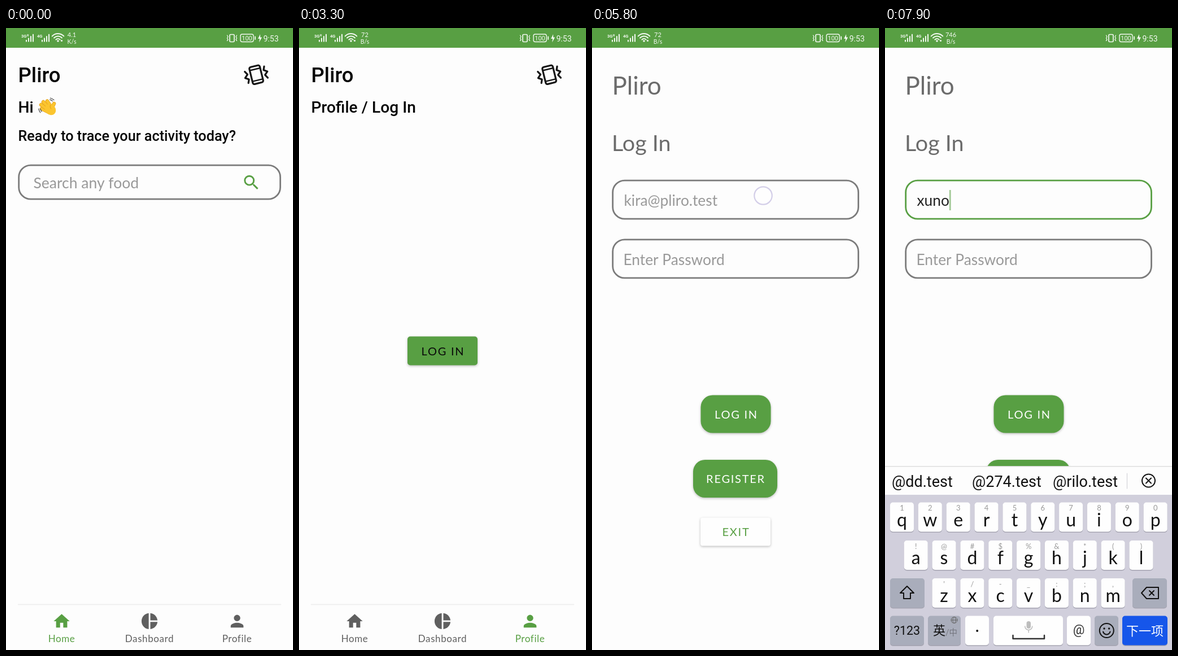
Animation of 508x1102 px, one loop 8000 ms. Source, as an HTML page with a canvas:

```html
<!DOCTYPE html>
<html lang="en">
<head>
<meta charset="utf-8">
<title>Food tracker demo</title>
<style>
html, body { margin: 0; width: 100%; height: 100%; overflow: hidden; background: #fdfdfd; }
canvas { display: block; width: 508px; height: 1102px; }
</style>
</head>
<body>
<canvas id="stage"></canvas>
<script>
const W = 508, H = 1102, LOOP = 8000, BAR = 35;
const GREEN = '#589f43', PAGE = '#fdfdfd', GREY = '#5f5f5f', HINT = '#999', EDGE = '#7b7b7b';
const UI = 'Lato, "Noto Sans CJK SC", "Noto Sans CJK JP", "Noto Sans CJK", sans-serif';
const HEAD = 'Roboto, sans-serif';
const APP = 'Pliro', MAIL = 'kira@pliro.test', TYPED = 'xuno';

const canvas = document.getElementById('stage');
const ctx = canvas.getContext('2d');
const dpr = window.devicePixelRatio || 1;
canvas.width = W * dpr;
canvas.height = H * dpr;

const ICONS = {
  home: new Path2D('M10 20v-6h4v6h5v-8h3L12 3 2 12h3v8z'),
  pie: new Path2D('M11 2v20c-5.07-.5-9-4.79-9-10s3.93-9.5 9-10zm2.03 0v8.99H22c-.47-4.74-4.24-8.52-8.97-8.99zm0 11.01V22c4.74-.47 8.5-4.25 8.97-8.99z'),
  person: new Path2D('M12 12c2.21 0 4-1.79 4-4s-1.79-4-4-4-4 1.79-4 4 1.79 4 4 4zm0 2c-2.67 0-8 1.34-8 4v2h16v-2c0-2.66-5.33-4-8-4z'),
  search: new Path2D('M15.5 14h-.79l-.28-.27A6.47 6.47 0 0 0 16 9.5 6.5 6.5 0 1 0 9.5 16c1.61 0 3.09-.59 4.23-1.57l.27.28v.79l5 4.99L20.49 19zm-6 0a4.5 4.5 0 1 1 0-9 4.5 4.5 0 0 1 0 9z')
};
const NAV = [['home', 'Home', 98.5], ['pie', 'Dashboard', 254], ['person', 'Profile', 409]];
const PAGES = [drawHome, drawDashboard, drawProfile];

const SWITCH = [1000, 2050];          // page changes in the bottom bar
const SLIDE = 4250, SLIDE_MS = 450;   // log-in screen reveal
const FOCUS = 5870, KEYS_UP = 6020, KEYS_MS = 320;
const TYPE_AT = 7200, TYPE_STEP = 150;
const SPEED = [[0, '4.1', 'K/s'], [300, '228', 'B/s'], [3100, '72', 'B/s'], [6300, '746', 'B/s']];

const KEY_ROWS = [
  ['qwertyuiop', '1234567890', 9, 840.5],
  ['asdfghjkl', '!@#$%&*()', 33.7, 908],
  ['zxcvbnm', "'/-_:;,", 83.5, 975]
];
const KEY_STEP = 49.85, KEY_W = 42, KEY_H = 52;

// x, y, press time, release time
const TAPS = [
  [254, 1064, 880, 1260],
  [409, 1064, 1950, 2250],
  [265, 570, 4150, 4290],
  [303, 297, 5650, 5870],
  ...[...TYPED].map((c, i) => {
    const t = TYPE_AT + i * TYPE_STEP;
    return [...keyCentre(c), t - 40, t + 20];
  })
];

const clamp = v => Math.max(0, Math.min(1, v));
const ramp = (t, from, ms) => clamp((t - from) / ms);
const easeOut = (p, n) => 1 - Math.pow(1 - p, n);

function keyCentre(c) {
  const [letters, , x, y] = KEY_ROWS.find(r => r[0].includes(c));
  return [x + letters.indexOf(c) * KEY_STEP + KEY_W / 2, y + KEY_H / 2];
}

function text(s, x, y, size, color, { font = UI, weight = 400, align = 'left', spacing = 0 } = {}) {
  ctx.font = `${weight} ${size}px ${font}`;
  ctx.textAlign = align;
  ctx.letterSpacing = spacing + 'px';
  ctx.fillStyle = color;
  ctx.fillText(s, x, y);
}

function heading(s, y, size, x = 21.5, align = 'left') {
  text(s, x, y, size, '#050505', { font: HEAD, weight: 500, align });
}

function box(x, y, w, h, r) {
  ctx.beginPath();
  ctx.roundRect(x, y, w, h, r);
}

function line(points, color, width, close) {
  ctx.beginPath();
  points.forEach(([x, y]) => ctx.lineTo(x, y));
  if (close) ctx.closePath();
  ctx.strokeStyle = color;
  ctx.lineWidth = width;
  ctx.lineCap = ctx.lineJoin = 'round';
  ctx.stroke();
}

function disc(x, y, r, color) {
  ctx.beginPath();
  ctx.arc(x, y, r, 0, Math.PI * 2);
  ctx.fillStyle = color;
  ctx.fill();
}

function ring(x, y, r, color, width, from = 0, to = Math.PI * 2) {
  ctx.beginPath();
  ctx.arc(x, y, r, from, to);
  ctx.strokeStyle = color;
  ctx.lineWidth = width;
  ctx.stroke();
}

function layer(draw, { x = 0, y = 0, alpha = 1, scale = 1, turn = 0 } = {}) {
  ctx.save();
  ctx.translate(x, y);
  ctx.scale(scale, scale);
  ctx.rotate(turn);
  ctx.globalAlpha *= alpha;
  draw();
  ctx.restore();
}

function icon(name, x, y, color, scale = 1.411) {
  layer(() => {
    ctx.fillStyle = color;
    ctx.fill(ICONS[name], 'evenodd');
  }, { x, y, scale });
}

function button(label, x, y, w, h, r, fill, color) {
  ctx.save();
  ctx.shadowColor = 'rgba(0,0,0,.26)';
  ctx.shadowBlur = 4 * dpr;
  ctx.shadowOffsetY = 1.5 * dpr;
  box(x, y, w, h, r);
  ctx.fillStyle = fill;
  ctx.fill();
  ctx.restore();
  text(label, x + w / 2 + 1, y + h / 2 + 7.8, 20, color, { align: 'center', spacing: 1.76 });
}

function field(x, y, w, h, color) {
  box(x, y, w, h, 21);
  ctx.strokeStyle = color;
  ctx.lineWidth = 2.8;
  ctx.stroke();
}

function drawStatus(t) {
  ctx.fillStyle = GREEN;
  ctx.fillRect(0, 0, W, BAR);
  const ink = 'rgba(255,255,255,.92)';
  [[27, '3G', 35], [55, '4G', 63]].forEach(([x, label, bars]) => {
    text(label, x, 17, 7.5, ink, { font: HEAD, weight: 700 });
    ctx.fillStyle = ink;
    for (let i = 0; i < 4; i++) ctx.fillRect(bars + i * 4, 21 - i * 3.4, 2, 3.5 + i * 3.4);
  });
  text('R', 37, 15, 5.5, ink, { font: HEAD, weight: 700 });
  [5, 9.5, 14].forEach(r => ring(92, 24, r, ink, 2, -Math.PI * .76, -Math.PI * .24));
  disc(92, 23, 1.8, ink);
  disc(98.5, 22.5, 1.6, ink);

  const [, value, unit] = SPEED.filter(s => s[0] <= t).pop();
  text(value, 116.5, 16, 11, ink, { align: 'center' });
  text(unit, 116.5, 28, 10.5, ink, { align: 'center' });

  box(396, 11.5, 8, 13, 1.5);
  ctx.strokeStyle = ink;
  ctx.lineWidth = 1.7;
  ctx.stroke();
  line([[391.5, 13], [393, 15.5], [391.5, 18], [393, 20.5], [391.5, 22.5]], ink, 1.3);
  line([[408.5, 13], [407, 15.5], [408.5, 18], [407, 20.5], [408.5, 22.5]], ink, 1.3);
  box(415, 11, 23, 13.5, 3);
  ctx.lineWidth = 1.4;
  ctx.stroke();
  text('100', 426.5, 22, 11, ink, { font: HEAD, align: 'center' });
  line([[441, 15.5], [441, 20]], ink, 1.8);
  ctx.beginPath();
  [[450, 11], [446, 19], [449, 19], [448, 25.5], [453, 16.5], [450, 16.5]].forEach(p => ctx.lineTo(...p));
  ctx.fillStyle = ink;
  ctx.fill();
  text('9:53', 455.5, 23.5, 14, ink, { font: HEAD });
}

function drawPhone() {
  const ink = '#151515';
  layer(() => {
    box(-9.5, -15.5, 19, 31, 3);
    ctx.strokeStyle = ink;
    ctx.lineWidth = 3.2;
    ctx.stroke();
    line([[-9, -10], [9, -10]], ink, 2.5);
    line([[-9, 10], [9, 10]], ink, 2.5);
    for (const s of [-1, 1]) {
      line([[17, -11], [14.5, -5], [20.5, -1], [15, 4], [18.5, 10]].map(([x, y]) => [s * x, s * y]), ink, 3.2);
    }
  }, { x: 443, y: 82.8, turn: -.24 });
}

function drawWave() {
  const gold = '#fbc52f', shade = '#e39c1c';
  layer(() => {
    line([[6, 5], [11, -6]], shade, 6.5);
    line([[6, 5], [11, -6]], gold, 5.2);
    [[-11, 3], [-12, -4], [-8, -9], [-1, -10.5]].forEach(([x, y], i) => {
      const root = [1 + i * 2, 9 - i * 2.6];
      line([[x, y], root], shade, 6.4);
      line([[x, y], root], gold, 5);
    });
    ctx.beginPath();
    ctx.ellipse(4.5, 4.5, 10.5, 9, .8, 0, Math.PI * 2);
    ctx.fillStyle = gold;
    ctx.fill();
    ring(10, -1, 6, shade, 1, 2.4, 3.6);
    [2.5, -1.3].forEach(a => {
      ring(0, 0, 13.5, '#555', 1.3, a, a + .4);
      ring(0, 0, 16.5, '#555', 1.3, a, a + .45);
    });
  }, { x: 74, y: 140 });
}

function drawHome() {
  heading('Hi', 150, 28.2);
  drawWave();
  heading('Ready to trace your activity today?', 200, 25.2);
  field(22.7, 243.2, 462.8, 60, EDGE);
  text('Search any food', 48.5, 284, 26.5, HINT);
  icon('search', 417, 256.5, GREEN, 1.44);
}

function drawDashboard() {
  heading('Dashboard', 150, 28.2);
  const mid = { align: 'center' };
  const col = i => 78.7 + i * 58.3;
  line([[82, 203.5], [75, 210.5], [82, 217.5]], '#151515', 2.8);
  line([[426.5, 203.5], [433.5, 210.5], [426.5, 217.5]], '#151515', 2.8);
  text('2021年12月', 254, 217.5, 19.5, '#1a1a1a', { align: 'center', weight: 500 });
  [...'日一二三四五六'].forEach((d, i) => text(d, col(i), 281.5, 16.5, '#777', mid));
  disc(428.5, 385.8, 28.4, '#9fc693');
  for (let d = 1; d <= 31; d++) {
    const cell = d + 2;
    const y = 335.3 + Math.floor(cell / 7) * 56.55;
    text(d, col(cell % 7), y, 17, d === 11 ? '#fff' : '#1c1c1c', { align: 'center', spacing: .4 });
  }
  heading('~ User Intakes ~', 642, 25.2, 254, 'center');
}

function drawProfile(t) {
  heading('Profile / Log In', 150, 28.2);
  const pressed = t > 4160 && t < 5000;
  button('LOG IN', 192, 546.5, 124, 51, 5, pressed ? '#427a33' : GREEN, '#0a0a0a');
}

function drawNav(t, active) {
  ctx.fillStyle = '#eeeeee';
  ctx.fillRect(21, 1020.5, 466, 1.8);
  ctx.save();
  ctx.beginPath();
  ctx.rect(0, 1022.5, W, H);
  ctx.clip();
  SWITCH.forEach((at, i) => {
    const grow = ramp(t, at - 60, 220), fade = ramp(t, at + 280, 280);
    if (grow > 0 && fade < 1) {
      disc(NAV[i + 1][2], 1062, 22 + 31.5 * easeOut(grow, 2), `rgba(0,0,0,${.1 * (1 - fade)})`);
    }
  });
  ctx.restore();
  NAV.forEach(([name, label, x], i) => {
    const color = i === active ? GREEN : GREY;
    icon(name, x - 16.9, 1034, color);
    text(label, x, 1088, 17, color, { align: 'center', spacing: .6 });
  });
}

function drawTabs(t) {
  ctx.fillStyle = PAGE;
  ctx.fillRect(0, BAR, W, H - BAR);
  heading(APP, 96, 36.5);
  drawPhone();
  const active = SWITCH.filter(s => t >= s).length;
  const shown = active ? ramp(t, SWITCH[active - 1] - 50, 150) : 1;
  if (shown < 1) layer(() => PAGES[active - 1](t), { alpha: 1 - shown });
  layer(() => PAGES[active](t), { alpha: shown });
  drawNav(t, active);
}

function drawLogin(t) {
  ctx.fillStyle = PAGE;
  ctx.fillRect(-W, BAR, W * 3, H);
  text(APP, 35.5, 118, 44, '#6b6b6b');
  text('Log In', 35, 218, 39.5, '#6b6b6b');
  const focused = t >= FOCUS;
  field(36.7, 270.2, 434.8, 68, focused ? GREEN : EDGE);
  field(36.7, 374.9, 434.8, 68, EDGE);

  const count = t < TYPE_AT ? 0 : Math.min(TYPED.length, 1 + Math.floor((t - TYPE_AT) / TYPE_STEP));
  const typed = TYPED.slice(0, count);
  text(typed || MAIL, 56.5, 315, 26.3, count ? '#222' : HINT);
  const caretX = 56.5 + (count ? ctx.measureText(typed).width : 0);
  text('Enter Password', 55.5, 419.5, 26.3, HINT);
  if (focused && (count || (t - FOCUS) % 1000 < 500)) {
    ctx.fillStyle = 'rgba(88,159,67,.55)';
    ctx.fillRect(caretX, 287, 2.8, 36);
  }
  button('LOG IN', 192.5, 650.5, 124, 67, 21, GREEN, '#fff');
  button('REGISTER', 179, 765, 149, 67, 21, GREEN, '#fff');
  button('EXIT', 192, 867.5, 124, 50, 4, '#fefefe', GREEN);
}

function key(x, y, w, fill = '#fefefe') {
  box(x, y + 1.5, w, KEY_H, 5);
  ctx.fillStyle = '#a5a4b1';
  ctx.fill();
  box(x, y, w, KEY_H, 5);
  ctx.fillStyle = fill;
  ctx.fill();
}

function drawKeyboard() {
  const dark = '#a9adbb', ink = '#111', mid = { align: 'center' };
  ctx.fillStyle = PAGE;
  ctx.fillRect(0, 777, W, 50);
  ctx.fillStyle = '#dedede';
  ctx.fillRect(0, 776, W, 1.5);
  ctx.fillStyle = '#d1cfdc';
  ctx.fillRect(0, 827, W, H - 827);
  [['@dd.test', 12], ['@274.test', 154], ['@rilo.test', 297]]
    .forEach(([s, x]) => text(s, x, 813, 27, ink, { font: HEAD }));
  line([[428.5, 789], [428.5, 816]], '#d3d3d8', 1.2);
  ring(466.5, 802, 11.5, ink, 2);
  line([[462, 797.5], [471, 806.5]], ink, 2);
  line([[471, 797.5], [462, 806.5]], ink, 2);

  KEY_ROWS.forEach(([letters, hints, x0, y]) => {
    [...letters].forEach((c, i) => {
      const x = x0 + i * KEY_STEP;
      key(x, y, KEY_W);
      text(hints[i], x + KEY_W / 2, y + 14.5, 13, HINT, mid);
      text(c, x + KEY_W / 2, y + 42, 32, ink, mid);
    });
  });

  key(9, 975, 61, dark);
  line([[39, 989], [51, 1001], [45, 1001], [45, 1011], [33, 1011], [33, 1001], [27, 1001]], ink, 2, true);
  key(438, 975, 61, dark);
  line([[454, 1001], [463, 991], [484, 991], [484, 1011], [463, 1011]], ink, 2, true);
  line([[468, 997], [476, 1005]], ink, 2);
  line([[476, 997], [468, 1005]], ink, 2);

  const y = 1041.5;
  key(9, y, 60, dark);
  text('?123', 39, 1075, 21.5, ink, { align: 'center', font: HEAD });
  key(76, y, 58, dark);
  text('英', 85, 1075, 22, ink);
  text('/中', 107, 1076, 14.5, '#74767f');
  ring(122.5, 1049, 5.5, '#666', 1);
  line([[117, 1049], [128, 1049]], '#666', 1);
  ctx.beginPath();
  ctx.ellipse(122.5, 1049, 2.5, 5.5, 0, 0, Math.PI * 2);
  ctx.stroke();
  key(142, y, KEY_W);
  disc(163.2, 1068, 2, ink);
  key(192, y, 123);
  box(250.5, 1051, 7.5, 13, 4);
  ctx.fillStyle = '#bdbdbd';
  ctx.fill();
  ring(254.2, 1060, 6.5, '#bdbdbd', 1.5, 0, Math.PI);
  line([[254.2, 1067], [254.2, 1071]], '#bdbdbd', 1.5);
  line([[226.5, 1076], [226.5, 1082], [282, 1082], [282, 1076]], '#333', 2.5);
  key(322, y, KEY_W);
  text('@', 343.2, 1073.5, 23, '#333', { align: 'center', font: HEAD });
  key(371, y, KEY_W, dark);
  ring(392.3, 1067.5, 12.5, ink, 2);
  disc(388, 1064, 1.7, ink);
  disc(396.6, 1064, 1.7, ink);
  ring(392.3, 1068, 6.5, ink, 2, .25, Math.PI - .25);
  key(420, y, 80, '#1656ea');
  text('下一项', 460, 1075.5, 22, '#fff', mid);
}

function drawTaps(t) {
  TAPS.forEach(([x, y, down, up]) => {
    const alpha = ramp(t, down, 60) * (1 - ramp(t, up, 170));
    if (alpha <= 0) return;
    layer(() => {
      disc(x, y, 16, 'rgba(255,255,255,.6)');
      ring(x, y, 15.7, '#d3cee8', 2.2);
    }, { alpha });
  });
}

function render(t) {
  ctx.setTransform(dpr, 0, 0, dpr, 0, 0);
  const shift = easeOut(ramp(t, SLIDE, SLIDE_MS), 2.4);
  const edge = W * (1 - shift);
  if (shift < 1) layer(() => drawTabs(t), { x: -.2 * (W - edge) });
  drawStatus(t);
  if (shift > 0) {
    ctx.fillStyle = `rgba(0,0,0,${.1 * shift})`;
    ctx.fillRect(0, 0, edge, H);
    ctx.save();
    ctx.beginPath();
    ctx.rect(edge, BAR, W, H);
    ctx.clip();
    layer(() => drawLogin(t), { x: edge / 2 });
    ctx.restore();
  }
  const rise = easeOut(ramp(t, KEYS_UP, KEYS_MS), 2.4);
  if (rise > 0) layer(drawKeyboard, { y: (H - 776) * (1 - rise) });
  drawTaps(t);
}

const start = performance.now();
function tick() {
  render((performance.now() - start) % LOOP);
  requestAnimationFrame(tick);
}
tick();
</script>
</body>
</html>
```
